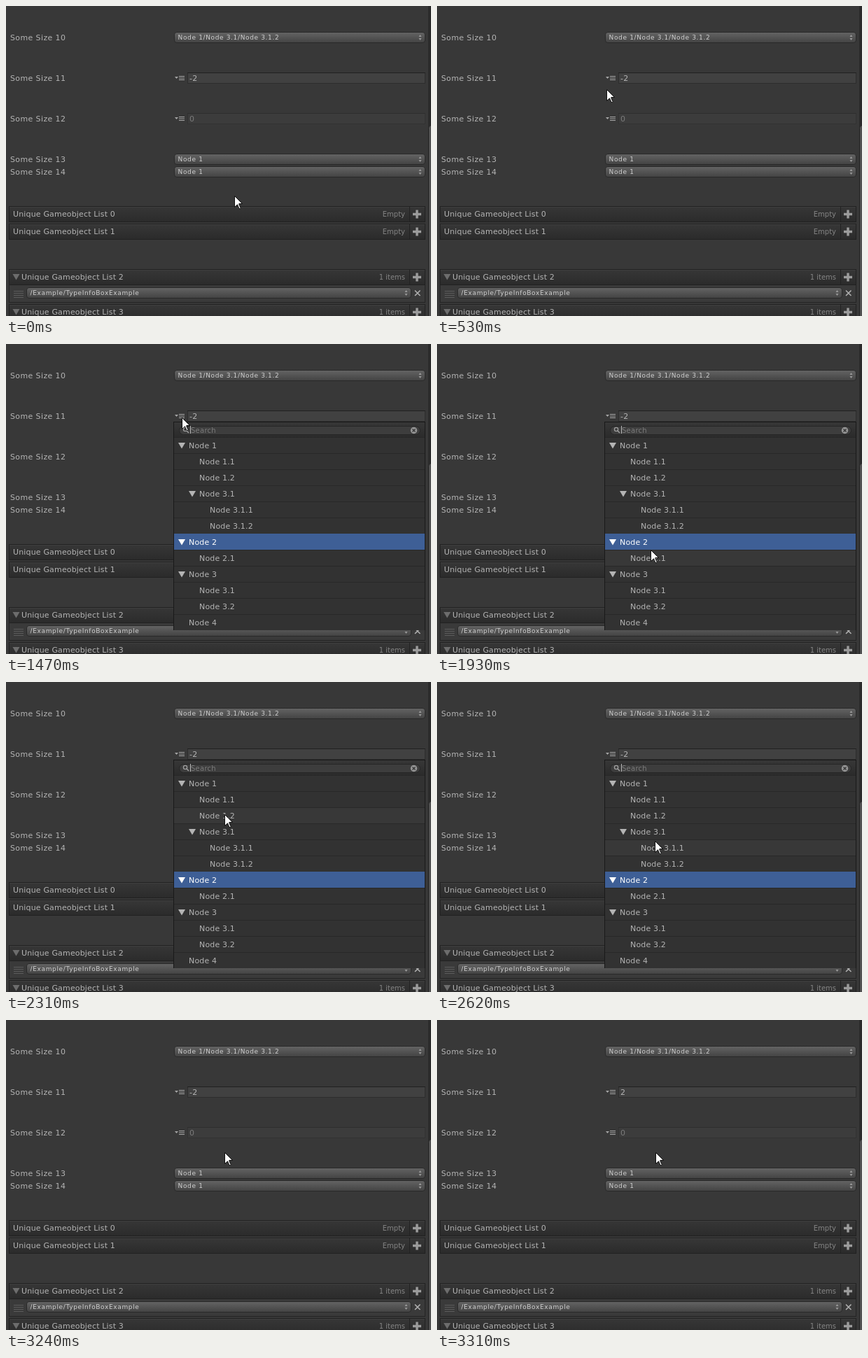
Write an HTML page that moves like this. It is 607x443 px and loops after 4250 ms.

```html
<!DOCTYPE html>
<html lang="en">
<head>
<meta charset="utf-8">
<title>Inspector dropdown</title>
<style>
  html, body { margin: 0; width: 100%; height: 100%; overflow: hidden; background: #383838; }
  svg { display: block; width: 607px; height: 443px; }
  text { font: 11px "DejaVu Sans", sans-serif; letter-spacing: .16px; fill: #b4b4b4; white-space: pre; }
  .label { letter-spacing: .38px; }
  .small { font-size: 9px; letter-spacing: .64px; fill: #d0d0d0; }
  .note { font-size: 10px; letter-spacing: 0; fill: #858585; }
  .search { font-size: 10px; letter-spacing: .25px; fill: #7c7c7c; }
  .dim { fill: #7c7c7c; }
  .bright { fill: #fff; }
</style>
</head>
<body>
<svg viewBox="0 0 607 443">
  <defs>
    <linearGradient id="button" x2="0" y2="1"><stop stop-color="#646464"/><stop offset="1" stop-color="#434343"/></linearGradient>
    <linearGradient id="header" x2="0" y2="1"><stop stop-color="#373737"/><stop offset="1" stop-color="#2b2b2b"/></linearGradient>
  </defs>
  <g id="panel"></g>
  <g id="menu"></g>
  <path id="cursor" d="M.5.5V16.5L4.5 12.8 7 18.5H8.5L9 17.4 6.8 12.5V11.5H11.5Z" fill="#fff" stroke="#111"/>
</svg>
<script>
const LOOP = 4250, TICK = 77, TICK_LEAD = 12;
const MENU_OPEN = 1150, MENU_CLOSE = 3240, VALUE_SET = 3310;
const ROW_TOP = 133, ROW_HEIGHT = 23;

// Pointer stops, eased between; equal neighbours are rests.
const stops = [
  { t: 75, x: 326, y: 271 }, { t: 580, x: 240, y: 116 },
  { t: 840, x: 249, y: 105 }, { t: 1390, x: 249, y: 105 },
  { t: 1460, x: 251, y: 105 }, { t: 1930, x: 305, y: 294 },
  { t: 2080, x: 300, y: 334 }, { t: 2310, x: 312, y: 189 },
  { t: 2470, x: 312, y: 189 }, { t: 2700, x: 311, y: 243 },
  { t: 3000, x: 312, y: 189 }
];

const nodes = "1 1.1 1.2 3.1 3.1.1 3.1.2 2 2.1 3 3.1 3.2 4".split(" ");
const selected = nodes.indexOf("2");
const depth = id => id ? id.split(".").length - 1 : 0;

const panel = document.getElementById("panel");
const menu = document.getElementById("menu");
const cursor = document.getElementById("cursor");
let layer = panel;

function add(tag, attrs, content = "") {
  const el = document.createElementNS("http://www.w3.org/2000/svg", tag);
  for (const name in attrs) el.setAttribute(name, attrs[name]);
  el.textContent = content;
  return layer.appendChild(el);
}
const rect = (x, y, width, height, fill, more) => add("rect", { x, y, width, height, fill, ...more });
const shape = (d, fill, more) => add("path", { d, fill, ...more });
const line = (d, stroke, width = 1) => shape(d, "none", { stroke, "stroke-width": width });
const text = (x, y, content, style = "") => add("text", { x, y, class: style }, content);

function popupButton(x, y, right, content) {
  rect(x + .5, y + .5, right - x - 1, 15, "url(#button)", { rx: 3.5, stroke: "#292929" });
  text(x + 5.6, y + 10.5, content, "small");
  shape(`M${right - 9.5} ${y + 7}l2-3 2 3zm0 2l2 3 2-3z`, "#9a9a9a");
}

function valueField(y, content, dim) {
  shape(`M241 ${y - 2}h5l-2.5 3z`, "#a6a6a6");
  line(`M247 ${y - 2.5}h8m-8 2.5h8m-8 2.5h8`, "#a6a6a6");
  rect(259.5, y - 7.5, 339, 15, dim ? "#3c3c3c" : "#414141", { stroke: dim ? "#323232" : "#2d2d2d" });
  line(`M259 ${y - 7.5}H599`, dim ? "#2e2e2e" : "#212121");
  return text(262, y + 4, content, dim ? "dim" : "");
}

function foldArrow(x, y, fill) {
  shape(`M${x} ${y - 4}h10l-5 8.5z`, fill);
}

function listHeader(y, title, note, open) {
  rect(4.5, y - 10.5, 594, 22, "url(#header)", { stroke: "#212121" });
  line(`M5 ${y - 9.5}H598`, "#3f3f3f");
  line(`M576.5 ${y - 10}V${y + 11}`, "#222");
  if (open) foldArrow(9.5, y, "#6d6d6d");
  text(open ? 22 : 10, y + 4, title);
  text(570, y + 4, note, "note").setAttribute("text-anchor", "end");
  line(`M581 ${y + .5}h12m-6-6v12`, "#9c9c9c", 3.4);
}

function drawPanel() {
  const sizeRows = [45, 103, 161, 219, 237];
  sizeRows.forEach((y, i) => text(6, y + 4, `Some Size ${10 + i}`, "label"));

  popupButton(240, 37, 599, "Node 1/Node 3.1/Node 3.1.2");
  const value = valueField(103, "-2");
  valueField(161, "0", true);
  popupButton(240, 211, 599, "Node 1");
  popupButton(240, 229, 599, "Node 1");

  listHeader(297, "Unique Gameobject List 0", "Empty");
  listHeader(322, "Unique Gameobject List 1", "Empty");
  rect(4.5, 398.5, 594, 25, "#3a3a3a", { stroke: "#242424" });
  listHeader(387, "Unique Gameobject List 2", "1 items", true);
  line("M11 407.5h14m-14 3h14m-14 3h14m-14 3h14", "#5c5c5c");
  popupButton(29, 402, 579, "/Example/TypeInfoBoxExample");
  line("M584 406.5l7.5 7.5m0-7.5l-7.5 7.5", "#b0b0b0", 1.6);
  listHeader(437, "Unique Gameobject List 3", "1 items", true);

  rect(603, 0, 4, 443, "#2b2b2b");
  rect(603.5, 170.5, 10, 290, "#525252", { rx: 4, stroke: "#222" });
  return value;
}

function drawMenu() {
  layer = menu;
  rect(239.5, 111.5, 359, 297, "#323232", { stroke: "#191919" });
  rect(240, 112, 358, 21, "url(#header)");
  rect(247.5, 117.5, 344, 12, "#3d3d3d", { rx: 6, stroke: "#252525" });
  add("circle", { cx: 256, cy: 122, r: 2.6, fill: "none", stroke: "#a0a0a0", "stroke-width": 1.3 });
  line("M258 124l3 3", "#a0a0a0", 1.5);
  text(264, 127, "Search", "search");
  line("M263.5 117v11", "#b8b8b8");
  add("circle", { cx: 582.5, cy: 123.5, r: 4.7, fill: "#949494" });
  line("M580.5 121.5l4 4m0-4l-4 4", "#333", 1.3);

  return nodes.map((id, i) => {
    const y = ROW_TOP + ROW_HEIGHT * i, indent = 15 * depth(id), active = i === selected;
    const row = rect(240, y, 358, ROW_HEIGHT, active ? "#3e5f96" : "#323232");
    if (!active) line(`M240 ${y + .5}h358`, "#282828");
    if (depth(nodes[i + 1]) > depth(id)) foldArrow(246 + indent, y + 12, active ? "#fff" : "#b4b4b4");
    text(261 + indent, y + 16, `Node ${id}`, active ? "bright" : "");
    return row;
  });
}

function pointerAt(time) {
  const t = Math.floor((time + TICK_LEAD) / TICK) * TICK;
  const next = stops.findIndex(stop => stop.t > t);
  if (next < 1) return stops.at(next);
  const a = stops[next - 1], b = stops[next];
  const u = (t - a.t) / (b.t - a.t), eased = u * u * (3 - 2 * u);
  const mix = key => Math.round(a[key] + (b[key] - a[key]) * eased);
  return { x: mix("x"), y: mix("y") };
}

const value = drawPanel();
const rows = drawMenu();
const start = performance.now();

function render(now) {
  const t = Math.max(0, now - start) % LOOP;
  const { x, y } = pointerAt(t);
  const hovered = Math.floor((y - ROW_TOP) / ROW_HEIGHT);

  cursor.setAttribute("transform", `translate(${x} ${y})`);
  menu.style.display = t >= MENU_OPEN && t < MENU_CLOSE ? "" : "none";
  value.textContent = t >= VALUE_SET ? "2" : "-2";
  rows.forEach((row, i) => {
    if (i !== selected) row.setAttribute("fill", i === hovered ? "#383838" : "#323232");
  });
  requestAnimationFrame(render);
}
render(start);
</script>
</body>
</html>
```
